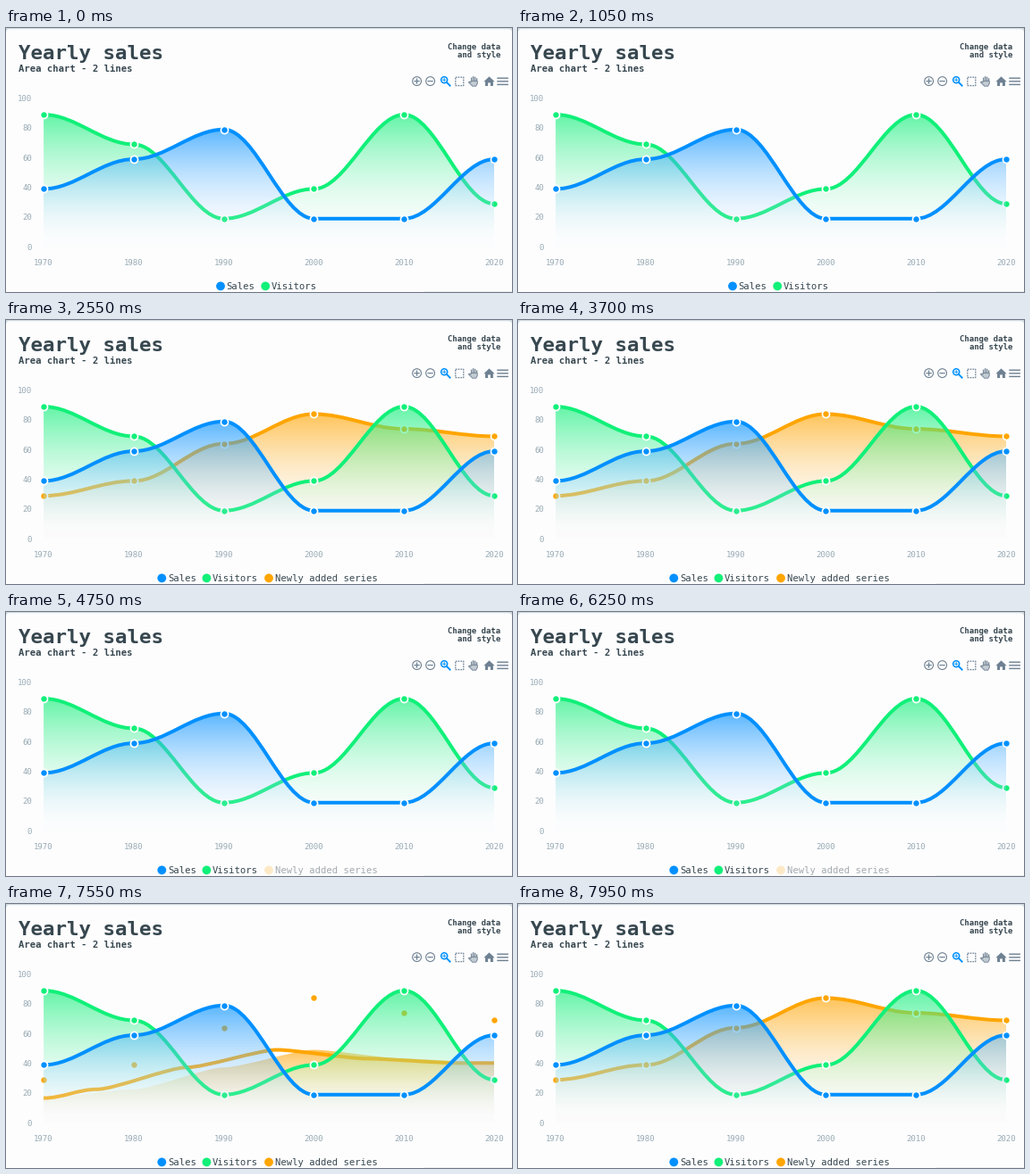
Recreate the animation shown at these times as a matplotlib script. Size 566 by 296 pixels, loop 8 s.

```python
import math
import numpy as np
import matplotlib.pyplot as plt
from matplotlib.animation import FuncAnimation
from matplotlib.colors import to_rgb
from matplotlib.patches import Circle, FancyBboxPatch, PathPatch, Polygon, Rectangle
from matplotlib.path import Path

W, H, DPI = 566, 296, 100
PX = 72 / DPI
STEP, LOOP = 50, 8000

BLUE, GREEN, ORANGE = "#0090ff", "#11f079", "#ffa500"
INK, LABEL, ICON = "#37474f", "#98abb4", "#6e8192"
PAGE = "#fdfdfe"

X0, DX, BASE, UNIT = 42.1, 100.78, 247.1, 5 / 3
XS = X0 + DX * np.arange(6)

ADD, HIDE, SHOW = 1196, 4400, 7104   # ms
GROW = 800

fig = plt.figure(figsize=(W / DPI, H / DPI), dpi=DPI, facecolor="#cfdbdf")
ax = fig.add_axes([0, 0, 1, 1])
ax.set_xlim(0, W)
ax.set_ylim(H, 0)
ax.set_autoscale_on(False)
ax.axis("off")


def text(x, y, s, size, color=INK, **kw):
    return ax.text(x, y, s, fontsize=size * PX, color=color, zorder=20,
                   family="DejaVu Sans Mono", **kw)


def stroke(xs, ys, color=ICON, width=1.2, **kw):
    return ax.plot(xs, ys, color=color, lw=width * PX, zorder=20,
                   snap=False, **kw)[0]


def ring(x, y, r, color=ICON, width=1.1):
    ax.add_patch(Circle((x, y), r, fill=False, ec=color, lw=width * PX, zorder=20))


def mix(a, b, p):
    return a + (b - a) * p


def curve(values, p=1.0, lag=0):
    """Bezier points of the smooth line, p of the way up from the baseline.

    With lag=1 every node also slides in from its left neighbour."""
    ys = BASE - UNIT * np.array(values, float)
    k = 0.35 * DX
    pts = [(XS[0], mix(BASE, ys[0], p))]
    for i in range(1, 6):
        start, end = XS[max(i - 1 - lag, 0)], XS[i - lag]
        low, high = mix(BASE, ys[i - 1], p), mix(BASE, ys[i], p)
        pts += [(mix(start, XS[i - 1] + k, p), low),
                (mix(end, XS[i] - k, p), high),
                (mix(end, XS[i], p), high)]
    if lag:
        y = mix(BASE, ys[5], p)
        pts += [(mix(XS[4], XS[5], p), y), (XS[5], y), (XS[5], y)]
    return pts


def line_path(values, p=1.0):
    pts = curve(values, p, lag=1)
    return Path(pts, [Path.MOVETO] + [Path.CURVE4] * (len(pts) - 1))


def area_path(values, p=1.0):
    pts = curve(values, p)
    codes = [Path.MOVETO, Path.LINETO] + [Path.CURVE4] * (len(pts) - 1)
    pts = [(XS[0], BASE)] + pts + [(XS[5], BASE), (XS[0], BASE)]
    return Path(pts, codes + [Path.LINETO, Path.CLOSEPOLY])


def fade(color):
    """Vertical ramp that turns white while it becomes transparent."""
    t = np.linspace(0, 1, 256)[:, None]
    rgb = mix(np.array(to_rgb(color)), 1, t)
    ramp = np.hstack([rgb, 0.65 * (1 - t)])
    return np.repeat(ramp[:, None, :], 2, axis=1)


class Series:
    def __init__(self, values, color, z):
        self.values = values
        self.fill = ax.imshow(fade(color), aspect="auto", interpolation="bilinear",
                              extent=(XS[0], XS[5], BASE, 0), zorder=z)
        self.line = ax.add_patch(PathPatch(line_path(values), fill=False, ec=color,
                                           lw=4 * PX, capstyle="butt", zorder=z + 0.1))
        ys = BASE - UNIT * np.array(values)
        self.dots = ax.scatter(XS, ys, s=(8.1 * PX) ** 2, fc=color, ec="white",
                               lw=1.7 * PX, zorder=z + 0.2)
        self.grow(1)

    def grow(self, p):
        self.line.set_path(line_path(self.values, p))
        top = BASE - max(UNIT * max(self.values) * p, 0.5)
        self.fill.set_extent((XS[0], XS[5], BASE, top))
        self.fill.set_clip_path(area_path(self.values, p), ax.transData)

    def show(self, body, dots):
        self.fill.set_visible(body)
        self.line.set_visible(body)
        self.dots.set_visible(dots)


def legend(items):
    parts = []
    for x, name, color in items:
        dot = ax.add_patch(Circle((x, 289.4), 4.9, fc=color, lw=0, zorder=20))
        parts += [dot, text(x + 6.7, 293.2, name, 10.45)]
    return parts


def toolbar():
    for x in (459.6, 474.6):
        ring(x, 59.6, 4.9)
        stroke([x - 2.5, x + 2.5], [59.6, 59.6])
    stroke([459.6, 459.6], [57.1, 62.1])

    ring(490.2, 58.2, 3.5, BLUE, 1.5)
    stroke([492.8, 496.6], [60.8, 64.6], BLUE, 1.9)
    stroke([488.5, 491.9], [58.2, 58.2], BLUE, 0.9)
    stroke([490.2, 490.2], [56.5, 59.9], BLUE, 0.9)

    stroke([502.8, 511.8, 511.8, 502.8, 502.8], [55.2, 55.2, 64.6, 64.6, 55.2],
           width=1.3, dashes=(1.3, 0.9))

    # hand: four fingers, thumb and palm
    for x, top in ((520.6, 56.2), (522.6, 54.8), (524.6, 55.4), (526.6, 57)):
        stroke([x, x], [top, 61], width=1.3)
    palm = [(520, 59.6), (527.2, 59.6), (527.2, 62.6), (525.6, 65.2),
            (521.8, 65.2), (517.4, 60.8), (518.3, 60), (520, 61.2)]
    ax.add_patch(Polygon(palm, fc="#c3ccd3", ec=ICON, lw=0.9 * PX, zorder=20))

    home = [(534.4, 60.2), (540.5, 54.4), (546.6, 60.2), (544.9, 60.2), (544.9, 65),
            (541.9, 65), (541.9, 61.4), (539.1, 61.4), (539.1, 65), (536.1, 65),
            (536.1, 60.2)]
    ax.add_patch(Polygon(home, fc=ICON, lw=0, zorder=20))

    for y in (56.2, 59.8, 63.4):
        stroke([550, 561.2], [y, y], width=1.4)


# card
ax.add_patch(FancyBboxPatch((0, 1.2), W, H + 20, fc=PAGE, lw=0, zorder=0,
                            boxstyle="round,pad=0,rounding_size=4"))
ax.add_patch(Rectangle((467, 294.8), W - 467, 1.2, fc="#eceff1", lw=0, zorder=0.1))

text(14, 35.4, "Yearly sales", 22.5, weight="bold")
text(14.4, 48.6, "Area chart - 2 lines", 10.45, weight="bold")
text(553.4, 24, "Change data", 9.05, weight="bold", ha="right")
text(553.4, 33.2, "and style", 9.05, weight="bold", ha="right")
toolbar()

for v in range(0, 101, 20):
    text(29, 248.6 - UNIT * v, str(v), 9, LABEL, ha="right")
for i, x in enumerate(XS):
    text(x, 266.4, str(1970 + 10 * i), 9, LABEL, ha="center")

added = Series([30, 40, 65, 85, 75, 70], ORANGE, 1)
visitors = Series([90, 70, 20, 40, 90, 30], GREEN, 2)
sales = Series([40, 60, 80, 20, 20, 60], BLUE, 3)

short_legend = legend([(240, "Sales", BLUE), (290.2, "Visitors", GREEN)])
long_legend = legend([(174.3, "Sales", BLUE), (224.4, "Visitors", GREEN),
                      (294, "Newly added series", ORANGE)])


def ease(t):
    return 0.5 - 0.5 * math.cos(math.pi * min(max(t, 0), 1))


def draw(frame):
    t = frame * STEP
    present = t >= ADD
    hidden = HIDE <= t < SHOW
    building = ADD <= t < ADD + GROW

    body = present and not hidden
    added.grow(ease((t - (SHOW if t >= SHOW else ADD)) / GROW))
    added.show(body, body and not building)
    for s in (visitors, sales):
        s.show(True, not building)

    for part in short_legend:
        part.set_visible(not present)
    for part in long_legend:
        part.set_visible(present)
    dot, name = long_legend[-2:]
    dot.set_alpha(0.22 if hidden else 1)
    name.set_alpha(0.45 if hidden else 1)
    return []


anim = FuncAnimation(fig, draw, frames=LOOP // STEP, init_func=lambda: draw(0),
                     interval=STEP, repeat=True, repeat_delay=0, blit=False)
plt.show()
```
